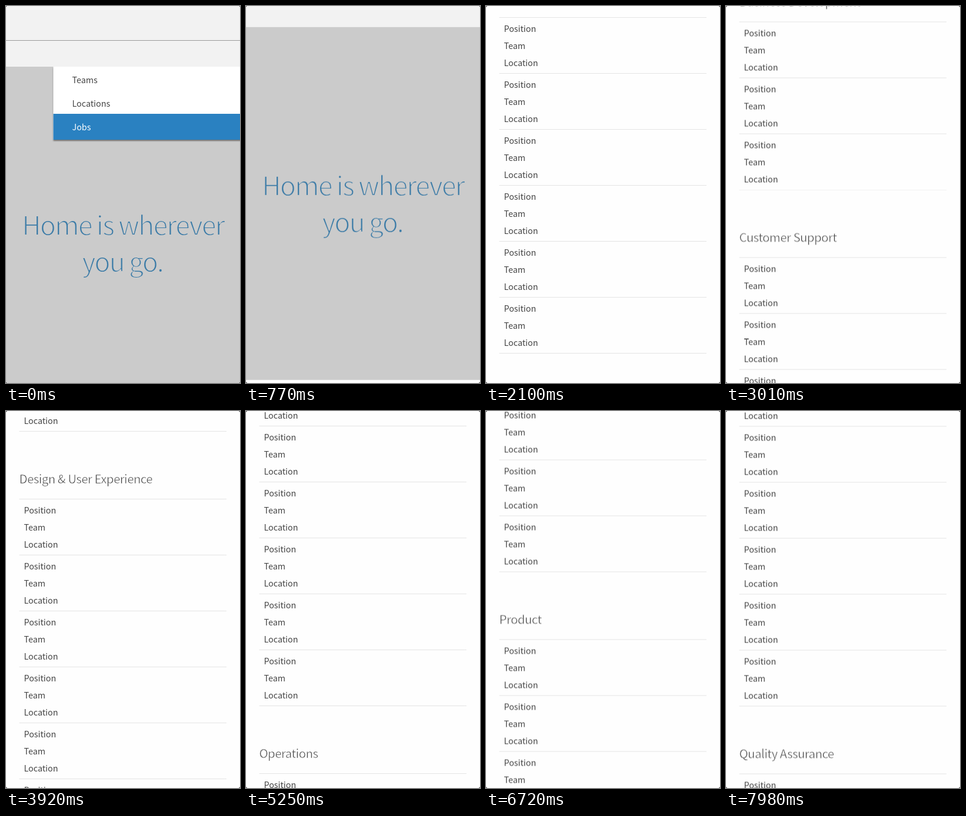
Recreate the animation shown at these times as an HTML page. Size 398 by 640 pixels, loop 8 s.

```html
<!DOCTYPE html>
<html lang="en">
<head>
<meta charset="utf-8">
<title>Jobs page scroll</title>
<style>
  html, body { margin: 0; width: 100%; height: 100%; overflow: hidden; background: #222; }
  #stage {
    position: relative; width: 398px; height: 640px; overflow: hidden;
    border-radius: 3px; background: #fefefe;
  }
  #page {
    position: absolute; left: 0; top: 0; display: block;
    animation: scroll 8s infinite;
  }
  text {
    font-family: "Noto Sans CJK JP", "Noto Sans CJK SC", "Noto Sans CJK", "Open Sans", sans-serif;
    font-size: 14.3px; fill: #444; white-space: pre;
  }
  .title { font-size: 20px; font-weight: 300; }
  .hero { font-size: 43px; font-weight: 100; fill: #3b7ba7; text-anchor: middle; }
  .hint { fill: #8e8e8e; }
  .active { fill: #fff; }
  .box { fill: #fff; stroke: #e2e2e2; }
  .rule { fill: #e4e4e4; }
  .icon { fill: none; stroke: #555; stroke-width: 1.2; }
  .lens { fill: none; stroke: #b5b5b5; }
  #menu { animation: close 8s infinite; }

  /* Trims regular glyphs when light weights are not installed */
  .trim .title { font-size: 20.4px; letter-spacing: -.026em; stroke: #fefefe; stroke-width: .6px; }
  .trim .hero { font-size: 45px; letter-spacing: -.045em; stroke: #cbcbcb; stroke-width: 1.9px; }

  @keyframes close {
    0% { opacity: 1; animation-timing-function: steps(6); }
    5.25%, 100% { opacity: 0; }
  }
  @keyframes scroll {
    0% { transform: translateY(0); }
    6.125% { transform: translateY(0); animation-timing-function: cubic-bezier(.33, 0, .67, .33); }
    11.375% { transform: translateY(-151px); animation-timing-function: steps(6); }
    16.625% { transform: translateY(-466px); animation-timing-function: steps(11); }
    26.25% { transform: translateY(-1044px); animation-timing-function: steps(26); }
    49% { transform: translateY(-2399px); }
    49.875% { transform: translateY(-2399px); animation-timing-function: steps(18); }
    65.625% { transform: translateY(-3398px); animation-timing-function: steps(21); }
    84% { transform: translateY(-4500.5px); animation-timing-function: steps(18); }
    99.75%, 100% { transform: translateY(-5432.5px); }
  }
</style>
</head>
<body>
<div id="stage">
  <svg id="page" width="398" height="6400">
    <defs>
      <g id="row">
        <text x="30.5" y="25">Position</text>
        <text x="30.5" y="54">Team</text>
        <text x="30.5" y="83">Location</text>
        <rect class="rule" x="22.5" y="95" width="352.5" height="1"/>
      </g>
      <path id="chevron" class="icon" d="M-6 -3 L0 3 L6 -3"/>
      <filter id="shadow" x="-5%" y="-5%" width="110%" height="115%">
        <feDropShadow dx="0" dy="2" stdDeviation="1.2" flood-color="#000" flood-opacity=".45"/>
      </filter>
    </defs>

    <rect width="398" height="103" fill="#f2f2f2"/>
    <rect y="58" width="398" height="1" fill="#999"/>
    <rect y="103" width="398" height="599" fill="#cbcbcb"/>
    <text class="hero" x="199" y="388.5">Home is wherever</text>
    <text class="hero" x="198" y="450.5">you go.</text>

    <g id="menu">
      <rect x="80.5" y="103" width="330" height="124" fill="#fff" filter="url(#shadow)"/>
      <rect x="80" y="101" width="318" height="2" fill="#f2f2f2"/>
      <rect x="80.5" y="183" width="318" height="44" fill="#2a81c1"/>
      <text x="112.5" y="131">Teams</text>
      <text x="112.5" y="171">Locations</text>
      <text class="active" x="112.5" y="211">Jobs</text>
    </g>

    <g transform="translate(0 702)">
      <rect class="box" x="22.5" y="24.5" width="352" height="39" rx="2.5"/>
      <text class="hint" x="47.5" y="49">Search job: Imperial Leader</text>
      <circle class="lens" cx="346" cy="43.5" r="8.5"/>
      <path class="lens" d="M352.5 49.5 L361 56"/>
      <rect class="box" x="22.5" y="96.5" width="352" height="33"/>
      <text x="29.5" y="118.5">Team</text>
      <use href="#chevron" x="361.5" y="113"/>
      <rect class="box" x="22.5" y="146.5" width="352" height="33"/>
      <text x="29.5" y="168.5">Location</text>
      <use href="#chevron" x="361.5" y="163"/>
    </g>

    <g id="list"></g>
  </svg>
</div>
<script>
  const ROW = 95, GAP = 115;
  const sections = [
    ['Accounting &amp; Financing', 6],
    ['Business Development', 3],
    ['Customer Support', 3],
    ['Design &amp; User Experience', 6],
    ['Engineering', 7],
    ['Operations', 8],
    ['Product', 11],
    ['Quality Assurance', 2]
  ];

  let lineY = 1063, markup = '';
  for (const [title, count] of sections) {
    markup += `<text class="title" x="22.5" y="${lineY - 26}">${title}</text>
      <rect class="rule" x="22.5" y="${lineY}" width="352.5" height="1"/>`;
    for (let i = 0; i < count; i++) markup += `<use href="#row" y="${lineY + i * ROW}"/>`;
    lineY += count * ROW + GAP;
  }
  document.getElementById('list').innerHTML = markup;

  const pen = document.createElement('canvas').getContext('2d');
  const widthAt = weight => {
    pen.font = `${weight} 100px "Noto Sans CJK JP", "Noto Sans CJK SC", "Noto Sans CJK", "Open Sans", sans-serif`;
    return pen.measureText('Home is wherever').width;
  };
  const hasLight = widthAt(100) !== widthAt(400);
  document.getElementById('stage').classList.toggle('trim', !hasLight);
</script>
</body>
</html>
```
